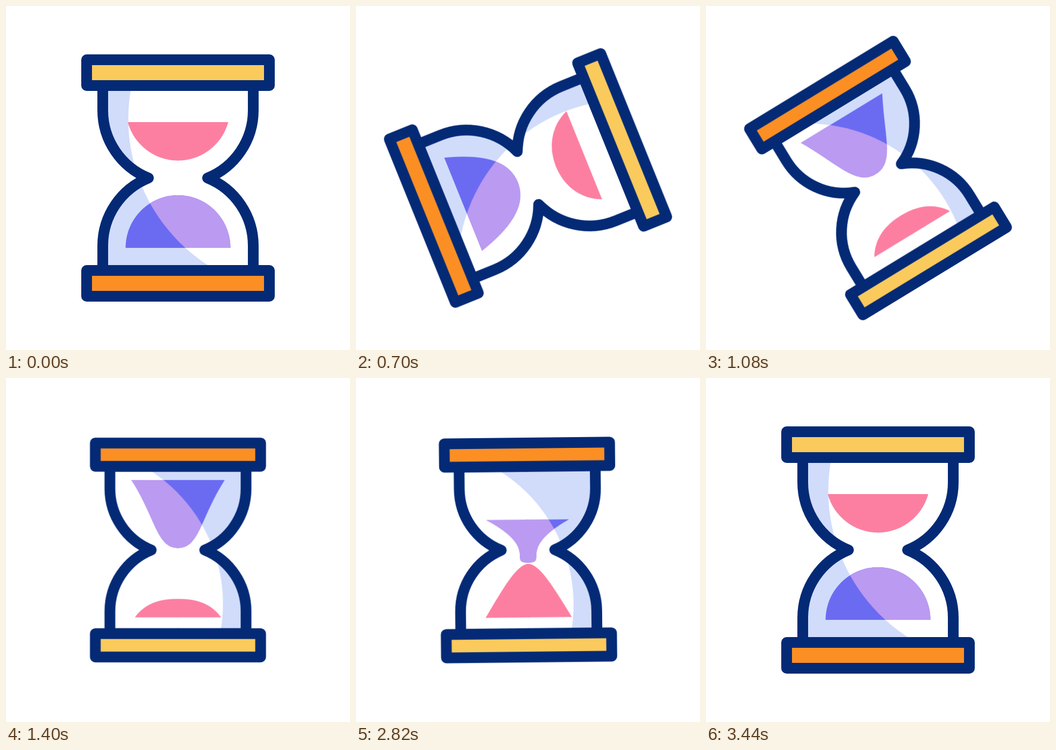
Animation of 640x640 px, one loop 3600 ms. Source, as an HTML page without scripts:

```html
<!DOCTYPE html>
<html lang="en">
<head>
<meta charset="utf-8">
<title>Hourglass</title>
<style>
  html, body { margin: 0; width: 100%; height: 100%; overflow: hidden; background: #fff; }
  svg { display: block; width: 100vw; height: 100vh; }

  .turn, .lilac, .pink, .pin { animation: 3.6s cubic-bezier(.3333, 0, .6667, 1) infinite; }
  .flip { transform: scale(-1, 1); }

  .turn { animation-name: turn; }
  .frame { fill: none; stroke: #042a76; stroke-linejoin: round; }
  .lilac { animation-name: lilac; }
  .pink { fill: #fc7fa1; animation-name: pink; }
  .pin {
    fill: none; stroke: #ffcb55; stroke-width: 20.5; stroke-linecap: round;
    stroke-dasharray: 1 3; animation-name: pin;
  }

  /* Turn over, pour, turn back; stroke-width cancels the scale */
  @keyframes turn {
    0%, 5.55%, 94.47%, 100% { transform: rotate(0deg) scale(1); stroke-width: 20; }
    38.88%, 77.8% { transform: rotate(180deg) scale(.9045); stroke-width: 22.11; }
  }

  /* Right half of each heap of sand: flat edge, then one curve to the tip */
  @keyframes lilac {
    0%, 5.55%, 94.47%, 100% { d: path("M-1 130H97.5C97.5 76 54 32 0 32H-1Z"); }
    38.88% { d: path("M-1 144H96C46 66 44 4 0 4H-1Z"); }
    61.11% { d: path("M-1 75H91C-15 33 40 -64 0 -64H-1Z"); }
    77.8% { d: path("M-1 62H85C-24 3 42 -26 0 -26H-1Z"); }
  }
  @keyframes pink {
    0%, 5.55%, 94.47%, 100% { d: path("M-1 -104H93.5C82 -62 44 -32.5 0 -32.5H-1Z"); }
    38.88% { d: path("M-1 -138.7H88.7C68 -110 38 -100.6 0 -100.6H-1Z"); }
    61.11% { d: path("M-1 -138.7H88.7C61 -92 31 -64 0 -64H-1Z"); }
    77.8% { d: path("M-1 -138.7H88.7C56 -85 24 -28.5 0 -28.5H-1Z"); }
  }

  @keyframes pin {
    0%, 52.7% { stroke-dashoffset: 1; visibility: hidden; }
    52.71% { stroke-dashoffset: 1; visibility: visible; }
    60.5%, 67.2% { stroke-dashoffset: 0; visibility: visible; }
    75% { stroke-dashoffset: -1; visibility: visible; }
    75.01%, 100% { stroke-dashoffset: -1; visibility: hidden; }
  }
</style>
</head>
<body>
<svg viewBox="0 0 640 640">
  <defs>
    <path id="half" d="M-1 -172H140V-126A136 136 0 0 1 55 0A136 136 0 0 1 140 126V172H-1"/>
    <circle id="light" cx="232" cy="-110" r="324.5"/>
    <clipPath id="inGlass">
      <use href="#half"/>
      <use href="#half" transform="scale(-1 1)"/>
    </clipPath>
    <clipPath id="inLight"><use href="#light"/></clipPath>
  </defs>

  <g transform="translate(320 320)">
    <g>
      <path class="pin" pathLength="1" d="M198 -103.5v28.5"/>
      <path class="pin" pathLength="1" d="M237 12v28.5"/>
    </g>
    <g class="flip">
      <path class="pin" pathLength="1" d="M198 -103.5v28.5"/>
      <path class="pin" pathLength="1" d="M237 12v28.5"/>
    </g>

    <g class="turn">
      <g clip-path="url(#inGlass)">
        <rect x="-140" y="-172" width="280" height="344" fill="#d1dcfb"/>
        <use href="#light" fill="#fff"/>
      </g>
      <g fill="#6b6bf2">
        <path class="lilac"/>
        <g class="flip"><path class="lilac"/></g>
      </g>
      <g fill="#bb9af1" clip-path="url(#inLight)">
        <path class="lilac"/>
        <g class="flip"><path class="lilac"/></g>
      </g>
      <path class="pink"/>
      <g class="flip"><path class="pink"/></g>

      <g class="frame">
        <use href="#half"/>
        <use href="#half" class="flip"/>
        <rect x="-170" y="-220" width="340" height="48" fill="#fbca5c"/>
        <rect x="-170" y="172" width="340" height="48" fill="#fb8f24"/>
      </g>
    </g>
  </g>
</svg>
</body>
</html>
```
